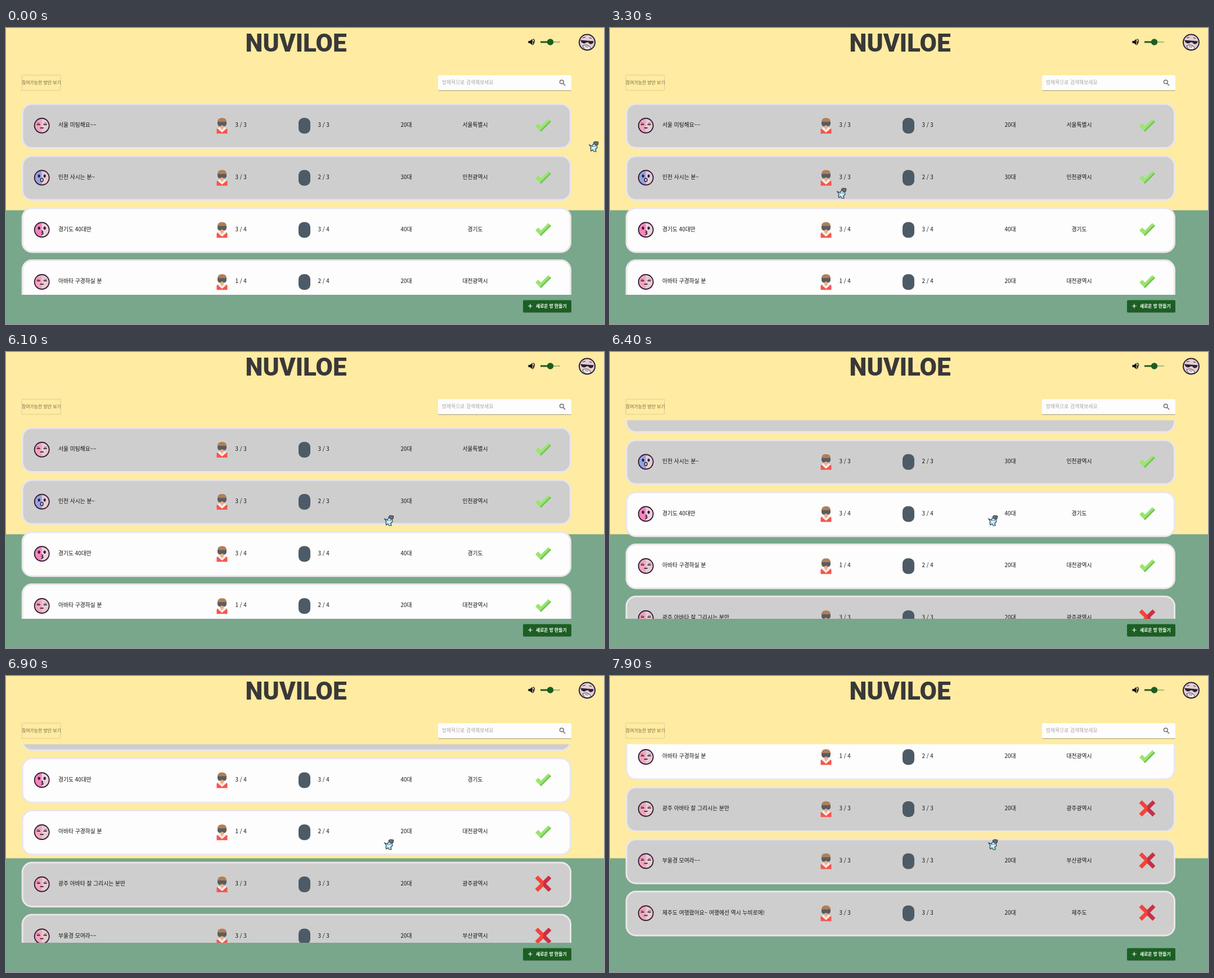
Animation, 1063 px wide and 527 px high, one loop 8000 ms. Source, as an HTML page:

```html
<!DOCTYPE html>
<html lang="ko">
<head>
<meta charset="utf-8">
<style>
  html, body { margin: 0; width: 100%; height: 100%; overflow: hidden; background: #ffeba1; }
  svg { display: block; width: 1063px; height: 527px; }
  text { font: 500 9.8px "Noto Sans CJK KR", "Noto Sans CJK", sans-serif; fill: #111; }
  .mid { text-anchor: middle; }
  .title { font: 800 44px Roboto, sans-serif; fill: #393839; }
  .filter { font-size: 7.9px; font-weight: 400; fill: #766d4b; }
  .hint { font-size: 8.8px; font-weight: 400; fill: #a5a5a5; }
  .action { font-size: 7.8px; font-weight: 700; fill: #fff; }
</style>
</head>
<body>
<svg viewBox="0 0 1063 527" xmlns="http://www.w3.org/2000/svg">
  <defs>
    <clipPath id="view"><rect x="20" y="121.5" width="995" height="353.5"/></clipPath>
    <filter id="shadow" x="-5%" y="-20%" width="110%" height="150%">
      <feDropShadow dx="0" dy="1" stdDeviation=".7" flood-opacity=".35"/>
    </filter>
    <g id="man">
      <path d="M-9.5 14V7q0-3 4-3h11q4 0 4 3v7z" fill="#f4574e"/>
      <path d="M-8.5 4.5L-3 3h6l5.5 1.5L0 12z" fill="#f6eeee"/>
      <path d="M-3 0h6v4L0 8l-3-4z" fill="#edb78f"/>
      <path d="M-7-6H7q0 9-7 9t-7-9z" fill="#dfae88"/>
      <path d="M-8-4v-4q1-6 8-6t8 6v4z" fill="#ae8058"/>
      <path d="M-8-7H8v4Q7 1 4 1L0-1l-4 2q-3 0-4-4z" fill="#5b5c61"/>
    </g>
    <rect id="woman" x="-10.5" y="-14" width="21" height="28" rx="9" fill="#4d5b66"/>
    <g id="check">
      <path d="M-14 2l5-5 5 5L9-11l5 5L-4 12z" fill="#9be56f"/>
      <path d="M14-6L-4 12l-2-2L12-8z" fill="#74c45c"/>
    </g>
    <g id="cross">
      <path d="M-9.5-14.5L0-5V5l-9.5 9.5-5-5L-5 0l-9.5-9.5z" fill="#f5433b"/>
      <path d="M9.5-14.5L0-5V5l9.5 9.5 5-5L5 0l9.5-9.5z" fill="#c93046"/>
    </g>
    <g id="calm" fill="none" stroke="#391b3a" stroke-width="1.7">
      <path d="M-9-2h6M3-2h6M-3 4h6"/>
      <path d="M-9-5l5 1M4-4l5-1" stroke-width=".7"/>
    </g>
    <g id="wow" fill="#281b3f">
      <ellipse cx="-5" cy="-3" rx="2" ry="2.8"/><ellipse cx="5" cy="-3" rx="2" ry="2.8"/>
      <ellipse cx="0" cy="4" rx="2.3" ry="3" fill="#eadbe0" stroke="#281b3f" stroke-width="1.5"/>
      <path d="M4 9V4l2-2v4h3l-1 4z" fill="#f1d6b8"/>
    </g>
    <g id="kiss" fill="#391b3a">
      <ellipse cx="-5" cy="-3" rx="2.1" ry="2.8"/><ellipse cx="5" cy="-3" rx="2.1" ry="2.8"/>
      <path d="M-1 2q5 0 1 3 5 1-1 4" fill="none" stroke="#391b3a" stroke-width="1.6"/>
    </g>
  </defs>

  <rect width="1063" height="527" fill="#ffeba1"/>
  <rect y="324.5" width="1063" height="203" fill="#78a78b"/>
  <text class="title mid" x="515.5" y="41.5">NUVILOE</text>

  <path d="M928.5 23h3l4-3.5v11l-4-3.5h-3z" fill="#111"/>
  <path d="M936.5 22.5q2 2.5 0 5M936.5 19.8q6 1 0 10.4" fill="none" stroke="#111" stroke-width="1.2"/>
  <path d="M967 25h18" stroke="#a9b579" stroke-width="2"/>
  <path d="M950 25h17" stroke="#1b5e20" stroke-width="3"/>
  <circle cx="967.5" cy="25" r="5.8" fill="#1b5e20"/>

  <g transform="translate(1033 25.5)">
    <circle r="14" fill="#e4cfcf" stroke="#2b2038" stroke-width="2"/>
    <path d="M-12-4L12-2 10 2q-5 3-8-2h-3q-4 4-9 0z" fill="#2b2038"/>
    <path d="M-8-8l5-1M4-8l4 1" stroke="#2b2038"/>
    <path d="M-8 6q7-3 12 1l3 4q-7 4-13 0z" fill="#f5eeee" stroke="#2b2038" stroke-width=".9"/>
    <path d="M-4 9l2-2 2 2 2-2" fill="none" stroke="#2b2038" stroke-width=".9"/>
  </g>

  <rect x="28" y="84" width="69" height="27" rx="1" fill="none" stroke="#ddcd91"/>
  <text class="filter" x="28" y="100">참여가능한 방만 보기</text>
  <rect x="768" y="84" width="237" height="27" rx="2" fill="#fdfdfd" filter="url(#shadow)"/>
  <text class="hint" x="775" y="100">방제목으로 검색해보세요</text>
  <g fill="none" stroke="#707070" stroke-width="1.5">
    <circle cx="987.8" cy="96" r="3.3"/><path d="M990 98.4l4 4"/>
  </g>

  <g clip-path="url(#view)"><g id="list"></g></g>

  <rect x="919" y="484.5" width="86" height="21.5" rx="2" fill="#1b5e20" filter="url(#shadow)"/>
  <path d="M928 495h7.6M931.8 491.2v7.6" stroke="#fff" stroke-width="1.2"/>
  <text class="action" x="942" y="497.5">새로운 방 만들기</text>

  <g id="cursor">
    <path d="M-8-3L-4-1 0-5 5-3 6 2 3 5 4 9H0L-2 6-5 8-6 4-5 2z" fill="#b6e3f4" stroke="#24394a" stroke-width="1.1"/>
    <path d="M-1-7L2-9 8-8 7-3 3-2z" fill="#6b7075" stroke="#26313b"/>
    <path d="M-3 1l2 2 4-2" fill="none" stroke="#f6fcff" stroke-width="1.6"/>
    <path d="M-2-1v2M2-1v2" stroke="#24394a"/>
  </g>
</svg>
<script>
const LOOP = 8000, STEP = 100, PITCH = 92.75;

// title, men, women, age, region, face, open room, joinable
const rooms = [
  ['서울 미팅해요~~', '3 / 3', '3 / 3', '20대', '서울특별시', 'calm', 0, 1],
  ['인천 사시는 분~', '3 / 3', '2 / 3', '30대', '인천광역시', 'wow', 0, 1],
  ['경기도 40대만', '3 / 4', '3 / 4', '40대', '경기도', 'kiss', 1, 1],
  ['아바타 구경하실 분', '1 / 4', '2 / 4', '20대', '대전광역시', 'calm', 1, 1],
  ['광주 아바타 잘 그리시는 분만', '3 / 3', '3 / 3', '20대', '광주광역시', 'calm', 0, 0],
  ['부울경 모여라~~', '3 / 3', '3 / 3', '20대', '부산광역시', 'calm', 0, 0],
  ['제주도 여행왔어요~ 여행에선 역시 누비로에!', '3 / 3', '3 / 3', '20대', '제주도', 'calm', 0, 0]
];
const skins = { calm: ['#efa6bb', '#e5ccd0'], wow: ['#94a2db', '#e0ccd5'], kiss: ['#f585ba', '#ead2d9'] };

const label = (x, text, cls = '') => `<text x="${x}" y="42" class="${cls}">${text}</text>`;
const icon = (id, x, y) => `<use href="#${id}" x="${x}" y="${y}"/>`;
const face = kind => `<g transform="translate(63.7 39.8)">
  <circle r="13" fill="${skins[kind][0]}"/><path d="M0-13a13 13 0 0 1 0 26z" fill="${skins[kind][1]}"/>
  <circle r="13" fill="none" stroke="#391b3a" stroke-width="1.9"/><use href="#${kind}"/></g>`;

const listEl = document.getElementById('list'), cursorEl = document.getElementById('cursor');
listEl.innerHTML = rooms.map(([title, men, women, age, region, kind, open, ok], i) =>
  `<g transform="translate(0 ${134 + i * PITCH})">
    <rect x="29.2" y="1.3" width="974.3" height="78.2" rx="17" fill="${open ? '#fdfdfd' : '#cecece'}" stroke="#ebe6e9" stroke-width="3"/>
    ${face(kind)}${label(93, title)}
    ${icon('man', 384, 40)}${label(407.5, men)}
    ${icon('woman', 530.5, 40)}${label(554.5, women)}
    ${label(711.5, age, 'mid')}${label(834, region, 'mid')}
    ${icon(ok ? 'check' : 'cross', 955, 38.7)}
  </g>`).join('');

// [time, value...]
const scrollKeys = [[6100, 0], [6200, 5], [6300, 45], [6400, 71], [6900, 174], [7100, 228],
  [7200, 247], [7300, 263], [7400, 272], [7500, 276], [7600, 276], [7700, 291], [7800, 302], [7900, 308]];
const cursorKeys = [[1900, 1045, 211], [2000, 988, 218], [2200, 770, 258], [2300, 680, 274], [2400, 610, 284],
  [2500, 567, 289], [2800, 567, 289], [3000, 535, 290], [3100, 535, 290], [3300, 412, 294],
  [4100, 412, 294], [4400, 553, 303], [4500, 553, 303], [4600, 556, 303], [4700, 556, 303],
  [4800, 557, 303], [5300, 557, 303], [6100, 681, 300]];

function at(keys, t) {
  const next = keys.findIndex(k => k[0] >= t);
  if (next < 0) return keys[keys.length - 1].slice(1);
  if (!next) return keys[0].slice(1);
  const a = keys[next - 1], b = keys[next], p = (t - a[0]) / (b[0] - a[0]);
  return a.slice(1).map((v, i) => v + (b[i + 1] - v) * p);
}

function draw(now) {
  const t = Math.floor(now % LOOP / STEP) * STEP;
  listEl.setAttribute('transform', `translate(0 ${-at(scrollKeys, t)[0]})`);
  cursorEl.setAttribute('transform', `translate(${at(cursorKeys, t)})`);
}
const start = performance.now();
(function tick() {
  draw(performance.now() - start);
  requestAnimationFrame(tick);
})();
</script>
</body>
</html>
```
